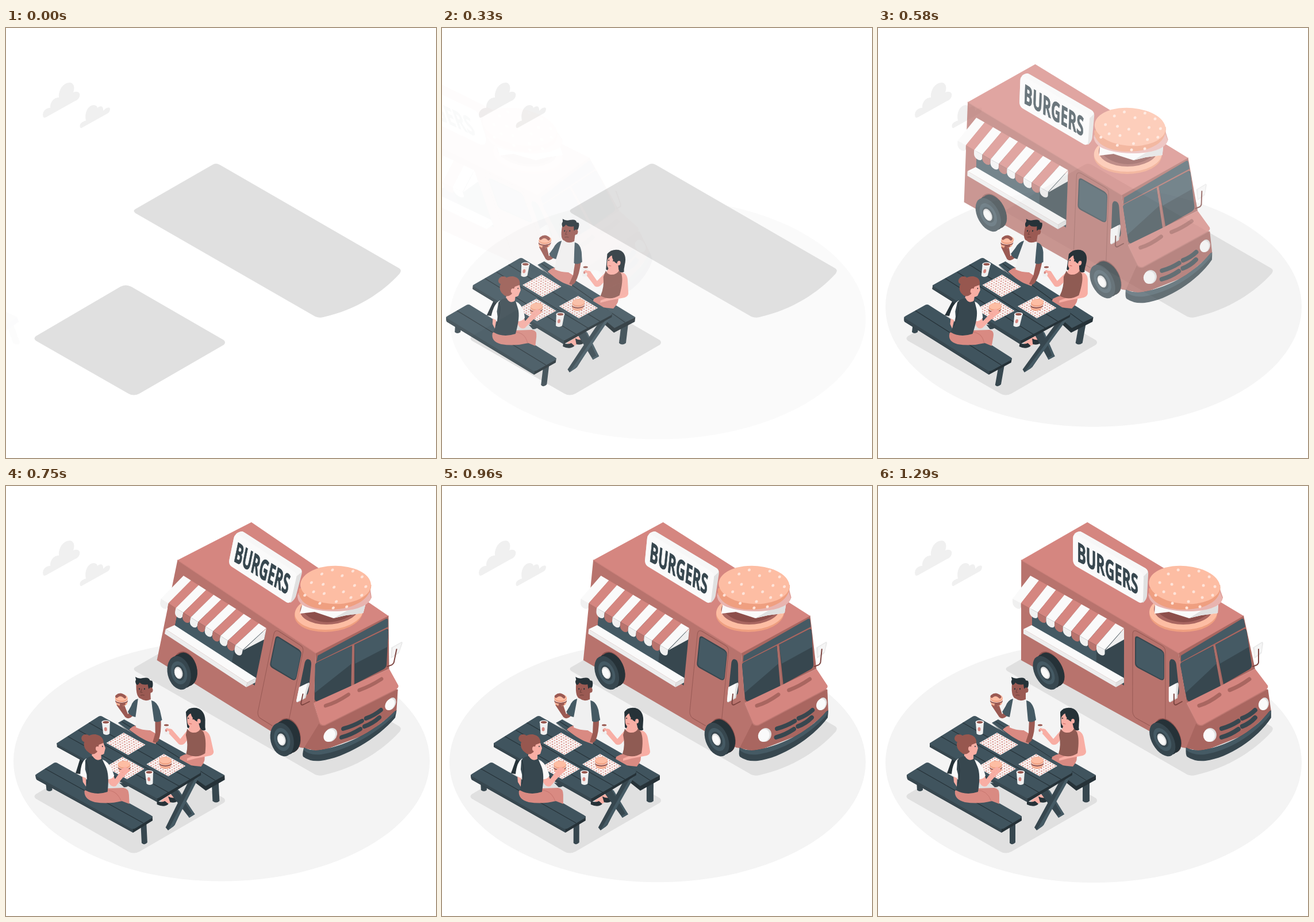
Animation of 748x748 px, one loop 1330 ms. Source, as an HTML page with a canvas:

```html
<!DOCTYPE html>
<html lang="en">
<head>
<meta charset="utf-8">
<title>Burger truck</title>
<style>
html, body { margin: 0; width: 100%; height: 100%; overflow: hidden; background: #fff; }
canvas { display: block; }
</style>
</head>
<body>
<canvas id="stage" width="748" height="748"></canvas>
<script>
const SIZE = 748, LOOP = 1330, STEP = 1000 / 24;
const stage = document.getElementById('stage').getContext('2d');
const sheet = document.createElement('canvas');
sheet.width = sheet.height = SIZE;
const layer = sheet.getContext('2d');
let g = stage;

const C = {
  roof: '#d58680', side: '#b8736d', front: '#a96660', seam: '#985a55',
  slate: '#455a64', dark: '#37474f', ink: '#263238', wood: '#40545e',
  white: '#fafafa', pale: '#f0f0f0', grey: '#e0e0e0',
  bun: '#fdbda3', crust: '#ef9f80', skin: '#f8aea4', brown: '#9b5a53',
  pants: '#d98a82', hair: '#97574f', vest: '#8f5b53', patty: '#8d4f4b'
};

function fill(color, path) {
  g.fillStyle = color;
  g.fill(new Path2D(path));
}
function line(color, width, path) {
  g.strokeStyle = color;
  g.lineWidth = width;
  g.lineCap = g.lineJoin = 'round';
  g.stroke(new Path2D(path));
}
function oval(color, x, y, rx, ry = rx, turn = 0) {
  g.fillStyle = color;
  g.beginPath();
  g.ellipse(x, y, rx, ry, turn * Math.PI / 180, 0, 7);
  g.fill();
}

// cubic-bezier(.36, -.01, .5, 1.38)
function ease(x) {
  if (x <= 0) return 0;
  if (x >= 1) return 1;
  const curve = (a, b, u) => 3 * a * u * (1 - u) ** 2 + 3 * b * u * u * (1 - u) + u ** 3;
  let low = 0, high = 1;
  for (let i = 0; i < 24; i++) {
    const mid = (low + high) / 2;
    if (curve(.36, .5, mid) < x) low = mid; else high = mid;
  }
  return curve(-.01, 1.38, low);
}

// Rush in from the left, lean back, settle; k runs from 0 to 1.
function rush(k) {
  if (k < .6) {
    const p = ease(k / .6);
    return { dx: -SIZE / 2 * (1 - p), skew: 20 - 30 * p, alpha: Math.min(1, Math.max(0, p)) };
  }
  const skew = k < .8 ? -10 + 12 * ease((k - .6) / .2) : 2 - 2 * ease((k - .8) / .2);
  return { dx: 0, skew, alpha: 1 };
}

function drawRushing(paint, k, pivotY) {
  const { dx, skew, alpha } = rush(k);
  if (alpha <= 0) return;
  const slope = Math.tan(skew * Math.PI / 180);
  layer.setTransform(1, 0, 0, 1, 0, 0);
  layer.clearRect(0, 0, SIZE, SIZE);
  layer.setTransform(1, 0, slope, 1, dx - slope * pivotY, 0);
  g = layer;
  paint();
  g = stage;
  g.globalAlpha = alpha;
  g.drawImage(sheet, 0, 0);
  g.globalAlpha = 1;
}

function drawGround(k) {
  const p = ease(k);
  g.globalAlpha = Math.min(1, Math.max(0, p));
  oval('#f4f4f4', 375, 481 + 45 * (1 - p), 362, 209);
  g.globalAlpha = 1;
  fill(C.grey, 'M225 315L359 238Q365 234 372 238L684 418Q689 421 685 427C655 460 610 490 552 503Q545 505 538 502L225 322Q220 318 225 315Z');
  fill(C.grey, 'M52 536L199 450Q208 445 218 450L379 543Q383 547 379 551L232 636Q222 641 213 636L52 544Q47 540 52 536Z');
  fill(C.pale, 'M65 155C62 147 68 139 77 139C76 129 84 120 92 121C91 106 101 94 112 95C120 97 119 106 117 112C123 109 130 111 128 119Q126 125 120 127L70 155Q66 157 65 155Z');
  fill(C.pale, 'M129 173C127 167 132 163 139 161C136 147 143 134 153 134Q159 135 159 139C164 134 170 136 169 144C174 138 181 136 181 141Q181 146 176 149L133 173Q130 175 129 173Z');
}

function drawWheel(x, y) {
  const disc = (color, dx, dy, r) => oval(color, x + dx, y + dy, r * .577, r, -30);
  disc(C.ink, 10, -6, 32);
  disc(C.ink, 5, -3, 32);
  disc(C.dark, 0, 0, 32);
  disc(C.slate, 0, 0, 22);
  disc(C.dark, 0, 0, 15);
  disc(C.grey, -1, 0, 11.5);
  disc(C.white, -1.5, .5, 9);
}

function drawAwning() {
  fill(C.dark, 'M268 205L428 255V347L268 247Z');
  fill(C.slate, 'M268 222L380 287V310L284 256L268 247Z');
  fill(C.white, 'M253 249L267 242L428 334L414 342Z');
  fill('#ededed', 'M253 249L414 342V350L253 257Z');
  fill(C.grey, 'M414 342L428 334V342L414 350Z');
  fill('#efefef', 'M428 248L395 286L428 267Z');
  const top = i => [265 + 14.8 * i, 156 + 8.3 * i];
  const rim = i => [234 + 14.6 * i, 196 + 8.1 * i];
  for (let i = 0; i < 11; i++) {
    const red = i % 2, [x0, y0] = rim(i), [x1, y1] = rim(i + 1);
    fill(red ? C.roof : C.white, `M${top(i)}L${top(i + 1)}L${x1} ${y1}L${x0} ${y0}Z`);
    fill(red ? C.side : C.pale, `M${x0} ${y0}L${x1} ${y1}V${y1 + 6}C${x1} ${y1 + 14} ${x0} ${y0 + 16} ${x0} ${y0 + 6}Z`);
  }
}

function drawSign() {
  fill(C.grey, 'M339 91Q339 83 347 80Q351 78 356 81L465 143Q470 146 470 152L468 190Q468 197 461 203L345 138Q339 134 339 128Z');
  fill('#f7f7f7', 'M341 84Q345 79 352 79L465 143Q469 146 469 150L461 158Z');
  fill(C.white, 'M339 91Q339 81 348 86L455 148Q462 152 462 159L461 197Q461 206 453 202L345 140Q339 136 339 129Z');
  g.save();
  g.transform(.505, .281, 0, 1, 346, 130);
  g.font = '700 46px "Open Sans", "Noto Sans", sans-serif';
  g.fillStyle = g.strokeStyle = C.dark;
  g.lineWidth = 1;
  g.fillText('BURGERS', 0, 0);
  g.strokeText('BURGERS', 0, 0);
  g.restore();
}

function drawRoofBurger() {
  oval(C.crust, 531, 222, 59, 32);
  oval(C.bun, 531, 219, 59, 31);
  oval(C.front, 531, 214, 51, 27);
  fill(C.patty, 'M483 215Q500 236 532 237Q565 236 582 214Z');
  fill('#dfa09a', 'M470 186Q474 207 500 212L568 214Q596 211 600 194L595 180Z');
  fill(C.white, 'M482 204L481 222L506 219L541 230L562 225L591 221L592 203L540 216Z');
  fill(C.grey, 'M541 230L562 225L591 221L592 204L562 217Z');
  fill('#e9b4af', 'M470 188C472 207 491 213 520 217C555 221 598 214 599 195L594 183Q560 216 500 206Z');
  fill(C.crust, 'M471 178C470 202 500 216 535 215C575 214 599 196 595 172Z');
  oval(C.bun, 533, 172, 62, 33, 5);
  const seeds = [490, 168, 505, 153, 522, 146, 541, 156, 558, 148, 576, 158, 586, 175, 566, 173, 549, 184, 531, 176, 511, 171, 516, 187, 497, 184, 540, 201, 564, 194, 582, 190, 483, 190, 512, 204, 537, 212, 560, 210];
  for (let i = 0; i < seeds.length; i += 2) oval('#fee3d8', seeds[i], seeds[i + 1], 2.5);
}

function drawCab() {
  // doors and side windows
  line(C.seam, 1, 'M443 393V258Q443 249 451 253L493 277Q500 281 500 288V405M443 393Q444 402 453 406L473 417');
  fill(C.dark, 'M447 266Q447 259 454 263L492 284Q498 288 498 294V332Q498 340 491 337L453 317Q447 314 447 308Z');
  fill(C.slate, 'M449 267Q449 262 454 265L491 286Q497 289 497 294V332Q497 338 491 335L454 315Q449 312 449 308Z');
  fill(C.dark, 'M507 307Q508 299 514 302Q518 304 519 311L524 357Q524 365 517 365L510 361Q507 358 507 353Z');
  // windscreen
  fill(C.front, 'M523 291L636 226L656 318L537 378Z');
  fill(C.slate, 'M527 295L633 231Q636 230 637 235L639 245L527 306Z');
  fill(C.dark, 'M526 311Q526 308 530 306L583 278L596 348L547 374Q539 377 537 370Z');
  fill(C.dark, 'M587 276L637 249Q640 248 641 252L650 310Q651 316 646 319L601 345Z');
  fill(C.slate, 'M526 311Q526 308 530 306L583 278L589 309L535 360Z');
  fill(C.slate, 'M587 276L637 249L641 252L645 280L595 309Z');
  line('#ad716c', 2, 'M585 278L598 348');
  // bonnet
  fill(C.roof, 'M537 377L656 318L678 347Q680 351 674 355L565 416Q558 419 554 411Z');
  line(C.front, 7, 'M559 382Q576 377 594 363M612 355Q630 348 646 336');
  fill(C.front, 'M554 412Q558 418 565 416L676 354Q679 352 679 357L684 392L640 432L565 462L536 456Z');
  line('#bd7771', 1.5, 'M537 380L554 412Q558 418 565 416L676 354');
  // bumper
  fill(C.dark, 'M536 455Q550 462 567 459C615 451 659 421 680 393Q684 388 684 394V403C660 440 610 473 570 478Q552 480 538 471Q535 468 536 455Z');
  fill(C.slate, 'M536 455Q550 462 567 459C615 451 659 421 680 393L684 390Q683 397 680 401C655 432 610 461 568 467Q548 469 536 459Z');
  line(C.dark, 8, 'M598 422Q613 418 627 409M634 404Q647 399 656 390M598 437Q613 433 627 423M634 418Q647 413 656 403');
  oval(C.grey, 578, 433, 11, 12);
  oval(C.white, 576, 434, 10, 11);
  oval(C.grey, 672, 379, 8, 11, 8);
  oval(C.white, 670, 380, 8, 10, 8);
  // mirrors
  fill(C.grey, 'M506 350L521 342Q523 342 523 346L521 369L509 376Q506 377 506 372Z');
  fill(C.white, 'M506 350L519 343L518 368L508 375Q506 376 506 372Z');
  line('#7d4541', 2, 'M515 362V378Q516 382 520 380L529 375');
  fill('#e9e9e9', 'M652 281L668 271Q670 271 670 274L668 288Q668 291 665 293L655 300Z');
  fill('#f5f5f5', 'M655 281L668 273L667 288L656 297Z');
  line('#7d4541', 2, 'M662 284L662 307Q661 311 657 312L652 314');
}

function drawTruck() {
  fill(C.side, 'M249 129L523 291L537 377L555 412L550 458L530 455L497 440L249 303Z');
  fill(C.roof, 'M249 129L364 63L636 226L523 291Z');
  line('#c87d77', 1, 'M249 129L523 291L636 226');
  oval('#8e524e', 301, 318, 19, 33, -30);
  oval('#8e524e', 505, 434, 19, 33, -30);
  drawWheel(292, 325);
  drawWheel(495, 441);
  drawAwning();
  drawCab();
  drawSign();
  drawRoofBurger();
}

function drawSnack(x, y) {
  oval(C.crust, x, y + 6, 10, 6);
  oval(C.bun, x, y + 5, 10, 5);
  oval(C.patty, x, y + 3, 11, 5);
  oval('#f4d1c6', x, y + 1, 11, 5);
  oval(C.crust, x, y - 2, 11, 7);
  oval(C.bun, x, y - 3, 10.5, 5.5);
}

function drawCup(x, y, s = 1) {
  fill(C.pale, `M${x - 7 * s} ${y}L${x - 5.5 * s} ${y + 20 * s}Q${x} ${y + 24 * s} ${x + 5.5 * s} ${y + 20 * s}L${x + 7 * s} ${y}Z`);
  oval(C.white, x, y, 7.5 * s, 3.4 * s);
  oval(C.hair, x, y, 5.5 * s, 2.2 * s);
  oval(C.roof, x - s, y + 12 * s, 2.5 * s, 3.5 * s);
}

function drawMat(x, y) {
  fill('#faf3f1', `M${x} ${y}l31-18l37 21l-31 18Z`);
  for (let i = 0; i < 9; i++)
    for (let j = 0; j < 8; j++) {
      const u = (i + .5) / 9, v = (j + .5) / 8;
      oval((i + j) % 2 ? C.roof : '#dda59f', x + 37 * u + 31 * v, y + 21 * u - 18 * v, 1.3, 1);
    }
}

function drawMan() {
  fill(C.pants, 'M217 424Q225 414 240 417L265 432L262 449L240 441Z');
  fill(C.brown, 'M231 380L216 397L211 382L203 376L197 381L211 402Q217 407 223 401L236 390Z');
  fill(C.pale, 'M229 376Q234 369 243 370L257 372Q267 376 266 390L267 423Q247 428 229 420Z');
  fill(C.slate, 'M235 370Q226 372 222 383L216 393Q221 401 229 402L232 386Z');
  fill(C.brown, 'M263 404L273 405Q273 429 267 443Q262 449 257 445L262 430Z');
  fill(C.slate, 'M258 373Q268 375 272 390L275 407Q267 413 261 409L259 387Z');
  fill(C.brown, 'M240 358H257V371Q247 376 240 370Z');
  fill(C.brown, 'M233 344Q244 334 257 346L258 359Q251 372 240 370Q231 368 233 344Z');
  fill(C.ink, 'M234 346Q230 341 233 337L232 332Q238 336 245 334Q256 332 257 338L261 339Q263 344 261 350L257 355L254 352L253 345Q244 347 239 342Q237 346 234 346Z');
  oval(C.brown, 258, 355, 3.5, 4.5);
  oval(C.ink, 238, 353, 1, 1.4);
  oval(C.ink, 247, 353, 1, 1.4);
  line('#70403b', 1, 'M242 353L240 359H243M240 364Q243 363 246 364');
  drawSnack(206, 371);
  line(C.brown, 5, 'M198 366Q205 360 212 367M205 381L210 379');
}

function drawGuest() {
  fill(C.ink, 'M317 393Q323 384 336 386Q350 390 350 407L349 424Q334 430 318 420Z');
  fill(C.pants, 'M303 471Q322 460 345 464Q349 477 339 488L300 484Z');
  fill(C.skin, 'M317 426L305 440L291 423L283 421L281 428L287 432L302 449Q307 452 312 448L323 435Z');
  fill(C.skin, 'M325 410H339L343 424Q356 426 358 439L362 462Q362 467 356 469L330 474L315 478V474L347 461L340 428L317 432Z');
  fill(C.vest, 'M318 422Q321 428 327 429Q337 430 341 422L346 428Q351 440 347 465Q332 475 314 466Q319 451 315 433Z');
  fill(C.skin, 'M319 401Q325 391 338 399L340 409Q332 422 322 418Q317 414 319 401Z');
  fill(C.ink, 'M319 396Q330 384 342 393L350 424Q343 428 340 420L338 411Q327 407 325 394L319 402Z');
  oval(C.skin, 339, 409, 3, 4);
  oval(C.ink, 321, 404, .9, 1.2);
  oval(C.ink, 329, 405, .9, 1.2);
  line('#cf665f', 1, 'M322 413L326 414');
  drawCup(282, 416, .75);
  line(C.skin, 4, 'M283 423L289 426');
  // feet below the table
  fill(C.skin, 'M281 537L299 535L297 544L278 553L265 548Z');
  fill(C.ink, 'M259 548Q267 551 273 548L279 553Q272 560 259 554ZM279 540Q289 545 295 540L298 543Q294 553 282 550Z');
}

function drawTable() {
  // far bench
  fill(C.dark, 'M356 516H368V548Q362 553 356 548Z');
  fill(C.ink, 'M198 413L345 520L379 503V511L345 530Z');
  fill(C.wood, 'M198 412L209 406L379 503L345 522Z');
  line(C.ink, 1, 'M205 410L362 512');
  drawMan();
  drawGuest();
  // trestles
  fill(C.ink, 'M131 469L143 475L129 501L120 500Z');
  fill(C.dark, 'M195 516L213 518Q211 524 203 524Z');
  fill(C.dark, 'M282 533L294 526L324 571L314 577Z');
  fill(C.slate, 'M294 526L299 530L324 571L314 577L312 574L319 570Z');
  fill(C.dark, 'M320 506L334 500L288 590L276 599L272 594Z');
  fill(C.slate, 'M331 502L336 503L286 592L276 599Z');
  // top
  fill(C.ink, 'M90 447L260 543L338 496V503L260 550L90 454Z');
  fill(C.dark, 'M90 447L260 543V550L92 455Q90 454 90 447Z');
  fill(C.wood, 'M92 446L163 402Q168 398 173 402L336 494Q340 497 336 500L265 541Q260 545 255 541L92 450Q88 448 92 446Z');
  line(C.ink, 1.2, 'M110 436L280 533M129 425L299 522M148 412L318 510');
  drawMat(176, 447);
  drawMat(172, 489);
  drawMat(244, 484);
  drawCup(177, 411);
  drawCup(248, 498);
  drawSnack(277, 480);
}

function drawSitter() {
  // near bench
  fill(C.dark, 'M67 512H78V529Q73 533 68 529ZM229 588L239 583V620Q234 626 229 621Z');
  fill(C.ink, 'M50 503L215 596L250 574V582L215 603L52 511Z');
  fill(C.dark, 'M50 502L215 596V603L52 511Q50 510 50 502Z');
  fill(C.wood, 'M52 501L81 483Q86 479 91 483L248 573Q252 576 248 578L220 595Q215 598 210 595L52 505Q49 503 52 501Z');
  line(C.ink, 1.2, 'M68 492L233 586');
  // seated woman
  fill(C.pants, 'M134 530Q151 521 174 526L202 525Q211 526 211 537L211 553L198 548Q175 554 151 550Q132 545 134 530Z');
  line('#c87770', 1, 'M172 529Q190 529 197 548');
  fill(C.skin, 'M131 502L138 503L137 523L132 515ZM174 503L185 502L188 510L202 492L210 487L216 494L203 506L189 522Q181 525 176 515Z');
  fill(C.white, 'M140 474Q130 479 128 502Q131 506 138 508L146 482ZM166 475Q178 479 184 494L187 504Q183 511 174 510L165 488Z');
  fill(C.skin, 'M150 462H166V475Q160 485 150 476Z');
  fill(C.dark, 'M138 477Q143 470 151 470Q158 481 167 474L173 488Q179 502 174 532Q153 539 135 529Q143 510 137 493Z');
  line(C.ink, 1, 'M139 478Q145 492 139 518');
  fill(C.skin, 'M154 445L170 444L174 456L171 466Q163 471 156 464Z');
  oval(C.hair, 141, 439, 8, 7);
  fill(C.hair, 'M137 448Q142 431 158 432Q172 435 171 447L163 450L159 463Q151 470 144 463Q136 457 137 448Z');
  oval(C.skin, 160, 457, 3, 4);
  oval(C.ink, 169, 453, .8, 1.2);
  drawSnack(205, 487);
  line(C.skin, 5, 'M200 496L207 491M204 500L211 494');
}

function drawPicnic() {
  drawTable();
  drawSitter();
}

function render() {
  const t = performance.now() % LOOP;
  const ms = Math.max(40, Math.floor((t + 4) / STEP) * STEP + 20);
  g = stage;
  g.clearRect(0, 0, SIZE, SIZE);
  drawGround(ms / 1000);
  drawRushing(drawTruck, (ms - 298) / 1025, 271);
  drawRushing(drawPicnic, ms / 1000, 478);
  requestAnimationFrame(render);
}
render();
</script>
</body>
</html>
```
